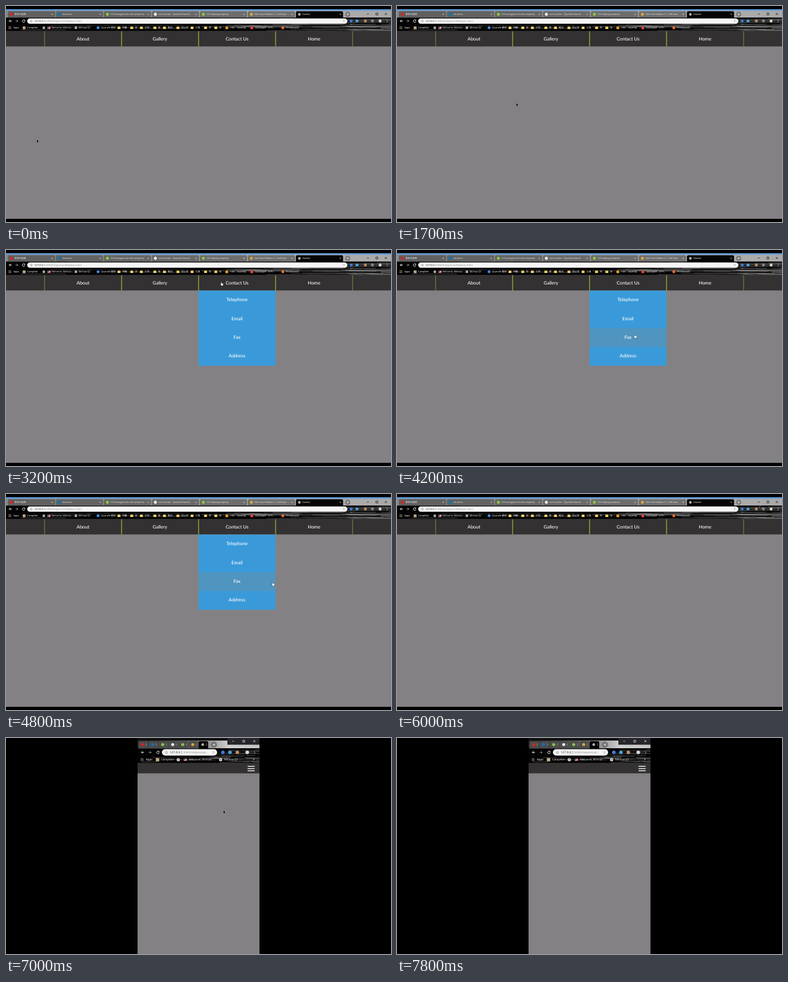
Write an HTML page with a canvas that moves like this. It is 600 by 338 pixels and loops after 8 s.

```html
<!DOCTYPE html>
<html lang="en">
<head>
<meta charset="utf-8">
<title>Responsive navbar</title>
<style>
  html, body { margin: 0; width: 100%; height: 100%; overflow: hidden; background: #000; }
  canvas { display: block; }
</style>
</head>
<body>
<canvas id="stage" width="600" height="338"></canvas>
<script>
const ctx = document.getElementById('stage').getContext('2d');
const LOOP = 8000, STEP = 100, MOBILE_AT = 6100, CURSOR_GONE = 7800;
const UI = '"Open Sans", "Noto Sans CJK SC", sans-serif';
const PAGE = 'Lato, sans-serif';

// Pointer tip: time, x, y
const path = [
  [0, 48, 209], [500, 186, 152.5], [1600, 186.5, 152.5], [1700, 186, 152],
  [1800, 186, 152], [2400, 114, 56], [2600, 114, 56], [2800, 238, 51],
  [2900, 238, 51], [3200, 334, 50], [3500, 336, 50], [4000, 362, 104],
  [4400, 376, 160], [4500, 384, 174], [4600, 392, 180], [4800, 414, 138],
  [5000, 464, 92], [5100, 500, 61], [5200, 500, 61], [5600, 490, 55],
  [5700, 490, 55], [6000, 566, 18], [6100, 218, 142], [6400, 300, 125],
  [6500, 300, 125], [7400, 370, 104], [7700, 329, 87], [8000, 329, 87]
];

function pointerAt(t) {
  const i = path.findIndex(k => k[0] > t);
  const [t0, x0, y0] = path[i - 1], [t1, x1, y1] = path[i];
  const p = (t - t0) / (t1 - t0);
  return [x0 + (x1 - x0) * p, y0 + (y1 - y0) * p];
}

function rect(x, y, w, h, color) {
  ctx.fillStyle = color;
  ctx.fillRect(x, y, w, h);
}
function pill(x, y, w, h, r, color) {
  ctx.fillStyle = color;
  ctx.beginPath();
  ctx.roundRect(x, y, w, h, r);
  ctx.fill();
}
function dot(x, y, r, color) {
  pill(x - r, y - r, 2 * r, 2 * r, r, color);
}
function text(str, x, y, size, color = '#fff', font = UI, align = 'left') {
  ctx.font = `500 ${size}px ${font}`;
  ctx.textAlign = align;
  ctx.textBaseline = 'middle';
  ctx.textRendering = 'geometricPrecision';
  ctx.fillStyle = color;
  ctx.fillText(str, x, y);
}
function stroke(d, color, width = .7, x = 0, y = 0) {
  ctx.save();
  ctx.translate(x, y);
  ctx.strokeStyle = color;
  ctx.lineWidth = width;
  ctx.stroke(new Path2D(d));
  ctx.restore();
}
function gradient(x, w, ...colors) {
  const g = ctx.createLinearGradient(x, 0, x + w, 0);
  colors.forEach((c, i) => g.addColorStop(i / (colors.length - 1), c));
  return g;
}

// Black browser theme with thin pale streaks, denser to the right
function theme(x, y, w, h, count) {
  rect(x, y, w, h, '#050505');
  let seed = 7;
  const random = () => (seed = seed * 16807 % 2147483647) / 2147483647;
  for (let i = 0; i < count; i++) {
    const sx = x + w * Math.cbrt(random()), sy = y + h * random();
    const len = Math.min(w * (.06 + .2 * random()), x + w - sx);
    stroke(`M${sx} ${sy}l${len} ${random() * 1.6 - .3}`,
      `rgba(255,255,255,${.2 + random() * .5})`, .4);
  }
}

function star(x, y) {
  text('☆', x, y, 5, '#333', '"DejaVu Sans", sans-serif', 'center');
}
function globe(x, y, s = 2) {
  dot(x, y, s, '#e6e6e6');
  stroke('M-1.4-.8L.2 0L-.4 1.2M.6-1.4L1.3.4', '#333', .6, x, y);
}
function flag(x, y) {
  rect(x - 2.3, y - 1.8, 4.6, 3.6, '#e8dede');
  for (let i = 0; i < 3; i++) rect(x - 2.3, y - 1.8 + i * 1.4, 4.6, .7, '#c33');
  rect(x - 2.3, y - 1.8, 2.2, 2, '#2a3f86');
}
function appsGrid(x, y) {
  for (let i = 0; i < 9; i++)
    rect(x + i % 3 * 1.5, y + Math.floor(i / 3) * 1.5, 1, 1, ['#e55', '#cc5', '#59d'][i % 3]);
}
function navButtons(x, y, gap) {
  stroke('M2 0H-2M0-2L-2 0L0 2', '#fff', .8, x, y);
  stroke('M-2 0H2M0-2L2 0L0 2', '#999', .8, x + gap, y);
  stroke('M1.7-1A2 2 0 1 0 2 .6M2-2V-.6H.6', '#fff', .8, x + 2.1 * gap, y);
}
function windowButtons(x, y, gap, color) {
  stroke('M-1.5 0H1.5', color, .7, x, y);
  stroke('M-1.5-1.5H1.5V1.5H-1.5Z', color, .7, x + gap, y);
  stroke('M-1.5-1.5L1.5 1.5M1.5-1.5L-1.5 1.5', color, .7, x + 2 * gap, y);
}
function menuDots(x, y) {
  for (const d of [-1.8, 0, 1.8]) dot(x, y + d, .5, '#eee');
}
function newTab(x, y, r) {
  dot(x, y, r, '#777');
  stroke('M-2 0H2M0-2V2', '#eee', .7, x, y);
}

const tabs = [
  ['#d22', '青禾听音阁'], ['#0a76b3', 'Vocarine'], ['#8cc63f', 'CSS background-color property'],
  ['#eee', 'color picker - Quandle Search'], ['#8cc63f', 'CSS display property'],
  ['#d9a441', 'Soft Hue Palette v1 | Soft Hue'], ['globe', 'Navbar']
];
const folders = [[176, '书籍'], [196, '学'], [211, '工作'], [232, '家'], [247, '笔记'],
  [268, '找公司'], [290, '工具'], [311, '车'], [327, '台']];

function tabIcon(color, x, y) {
  if (color === 'globe') globe(x, y);
  else dot(x, y, 2.4, color);
}

function desktopChrome() {
  rect(0, 0, 600, 338, '#000');
  rect(0, 7, 600, 11.5, gradient(0, 600, '#858585', '#8f8f8f', '#a2a2a2', '#b0b0b0', '#a8a8a8'));
  rect(0, 5, 600, 2.3, '#5f9bd8');
  theme(0, 18, 600, 21, 70);
  tabs.forEach(([color, title], i) => {
    const x = 3 + i * 74.8, active = i === 6;
    pill(x, 8.3, 73.5, 10.2, [2, 2, 0, 0], active ? '#050505' : 'rgba(70,70,70,.6)');
    tabIcon(color, x + 5.4, 13);
    text(title, x + 10.2, 13.2, 3.6, active ? '#fff' : '#f0f0f0');
    stroke('M-1-1L1 1M1-1L-1 1', '#ddd', .55, x + 69, 13);
  });
  newTab(532.5, 13, 4);
  windowButtons(564, 12.5, 14, '#111');

  navButtons(7, 23.5, 9.7);
  pill(33, 19.4, 499, 8.4, 4.2, '#f5f5f5');
  stroke('M-1.5 0A1.5 1.5 0 1 0 1.5 0A1.5 1.5 0 1 0-1.5 0M0-.2V.9', '#666', .5, 39.5, 23.6);
  text('127.0.0.1', 44, 23.7, 4.1, '#222');
  text(':5500/responsiveNavbar.html', 61.3, 23.7, 4.1, '#888');
  star(526.5, 23.5);
  [[538, '#3d7ddb'], [547, '#4aa3df'], [560, '#b98d62'], [571, '#888'], [583, '#d8d8d8']]
    .forEach(([x, c]) => dot(x, 23.5, 2.3, c));
  menuDots(594, 23.5);

  const y = 34;
  appsGrid(4, 32);
  text('Apps', 11.5, y, 3.8);
  rect(26, 32, 4.5, 4.3, '#b9a78b');
  text('CampNet', 33, y, 3.8);
  globe(59, y);
  flag(67, y);
  text('Welcome, Minhao -...', 71, y, 3.7);
  globe(109, y);
  text('Minhao Qi', 113, y, 3.7);
  dot(143.5, y, 2.3, '#4688e8');
  text('Quandle 翻译', 148, y, 3.7);
  folders.forEach(([x, name]) => {
    pill(x - 2.3, 32.2, 4.6, 3.8, .5, '#f4d06a');
    text(name, x + 5, y, 3.8);
  });
  rect(342, 32, 4.3, 4.3, '#e09a2c');
  text('Files - VaultNip', 349, y, 3.7);
  rect(381, 32, 4.3, 4.3, '#d44');
  text('Quirpaper - A Fr...', 388, y, 3.7);
  dot(431.5, y, 2.4, '#e46b32');
  text('Phrasenook', 436, y, 3.7);
}

function desktopPage(x, y, open) {
  rect(0, 63, 600, 270, '#838183');
  rect(0, 39, 600, 24.3, '#333132');
  ['About', 'Gallery', 'Contact Us', 'Home'].forEach((label, i) =>
    text(label, 120 + i * 120, 51.3, 7.3, '#fff', PAGE, 'center'));
  for (let i = 0; i < 5; i++)
    rect(59.6 + i * 120, 39.5, 1.1, 24, i % 4 ? '#aebd30' : '#6f8a3a');

  if (!open) return;
  const item = 29.4;
  rect(300, 63.5, 120, 4 * item, '#3a9ad9');
  const hovered = Math.floor((y - 63.5) / item);
  if (hovered >= 0) rect(300, 63.5 + hovered * item, 120, item, '#5094c0');
  ['Telephone', 'Email', 'Fax', 'Address'].forEach((label, i) =>
    text(label, 360, 78 + i * item, 7.3, '#fff', PAGE, 'center'));
}

function mobileView() {
  rect(0, 0, 600, 338, '#000');
  ctx.save();
  ctx.beginPath();
  ctx.rect(205, 0, 190, 338);
  ctx.clip();
  rect(205, 0, 190, 16.5, gradient(205, 190, '#242424', '#444', '#777', '#d0d0d0', '#c4c4c4'));
  rect(205, 0, 140, 4, '#111');
  theme(205, 16, 190, 23, 45);
  tabs.forEach(([color], i) => {
    const x = 206.5 + i * 15.6;
    pill(x, 5, 15, 11.5, [2, 2, 0, 0], i === 6 ? '#050505' : '#4c4c4c');
    tabIcon(color, x + 6.5, 10.3);
    rect(x + 12, 8.5, .6, 3.5, '#aaa');
  });
  newTab(324, 10.5, 5);
  rect(345, 0, 50, 10.5, '#25252a');
  windowButtons(354, 5, 16.5, '#eee');

  navButtons(213, 22.5, 11.3);
  pill(243, 17.5, 86, 10, 5, '#f5f5f5');
  stroke('M-1.8 0A1.8 1.8 0 1 0 1.8 0A1.8 1.8 0 1 0-1.8 0M0-.2V1', '#666', .5, 250, 22.6);
  text('127.0.0.1', 255, 22.7, 4.8, '#222');
  text(':5500/responsive...', 275.5, 22.7, 4.5, '#888');
  star(323.3, 22.4);
  [[338, '#3d7ddb'], [349, '#4aa3df'], [360.5, '#b98d62'], [376, '#d8d8d8']]
    .forEach(([x, c]) => dot(x, 22.5, 2.8, c));
  menuDots(387.5, 22.5);

  const y = 34;
  appsGrid(210, 31.8);
  text('Apps', 218, y, 4.5);
  rect(233.5, 31.3, 5.3, 5.3, '#c3b18f');
  text('CampNet', 242, y, 4.4);
  globe(268.5, y, 2.5);
  flag(279.5, y);
  text('Welcome, Minhao -...', 285, y, 4.3);
  globe(334.5, y, 2.5);
  text('Minhao Qi', 340, y, 4.3);
  text('»', 385, y - .3, 5.5);

  rect(205, 55, 190, 283, '#838183');
  rect(205, 39, 190, 16.3, '#333132');
  for (let i = 0; i < 3; i++) rect(376.5, 43.7 + i * 3.5, 11, 1.3, '#f4f4f4');
  ctx.restore();
}

const arrow = new Path2D('M0 0V4.2L1 3.4L1.8 5L2.5 4.7L1.8 3.1H3Z');
const hand = new Path2D('M1.2 .3Q1.9 0 2 .7V2.2L4 2.6Q4.7 2.8 4.5 3.7L4 5.8H1.7L.1 3.6Q.1 2.9 1.2 3.6Z');

function drawPointer(x, y, isHand) {
  const shape = isHand ? hand : arrow;
  ctx.save();
  ctx.translate(x, y);
  ctx.lineWidth = .7;
  ctx.strokeStyle = isHand ? '#111' : '#bbb';
  ctx.fillStyle = isHand ? '#fff' : '#000';
  ctx.stroke(shape);
  ctx.fill(shape);
  ctx.restore();
}

function draw(now) {
  const t = Math.floor(now % LOOP / STEP) * STEP;
  const [x, y] = pointerAt(t);
  if (t < MOBILE_AT) {
    const onNav = y > 39 && y < 63 && x > 60 && x < 540;
    const open = t > 3000 && x >= 300 && x < 420 && y > 39 && y < 181;
    desktopChrome();
    desktopPage(x, y, open);
    drawPointer(x, y, onNav || open);
  } else {
    mobileView();
    if (t < CURSOR_GONE) drawPointer(x, y, false);
  }
}

const start = performance.now();
function tick() {
  draw(performance.now() - start);
  requestAnimationFrame(tick);
}
tick();
</script>
</body>
</html>
```
